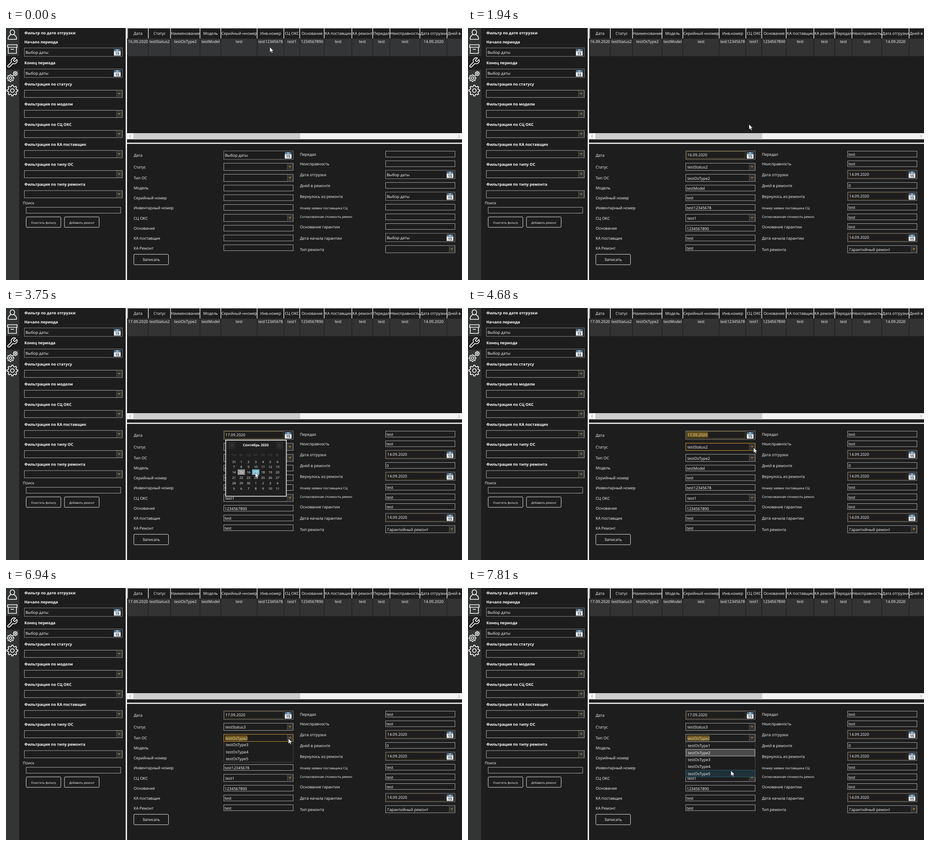
Animation, 1006 px wide and 556 px high, one loop 8 s. Source, as an HTML page:

```html
<!DOCTYPE html>
<html lang="ru">
<head>
<meta charset="utf-8">
<style>
  html, body { margin: 0; width: 100%; height: 100%; overflow: hidden; background: #1d1d1d; }
  svg { display: block; }
  text { font-family: "Open Sans", "Noto Sans", sans-serif; fill: #fff; text-rendering: geometricPrecision; white-space: pre; }
</style>
</head>
<body>
<svg id="stage" width="1006" height="556" viewBox="0 0 1006 556">
  <g id="fixed"></g>
  <g id="live"></g>
  <path id="cursor" d="M0 0V11.6L2.7 9.1L4.6 13.2L6.5 12.4L4.6 8.4H8.3Z" fill="#fff" stroke="#111" stroke-width=".6"/>
</svg>
<script>
const LOOP = 8000, BG = '#1d1d1d', LINE = '#a9a9a9', GOLD = '#d9a032';
const byId = id => document.getElementById(id);

// Drawing helpers; text is placed by its vertical centre.
const rect = (x, y, w, h, fill, stroke = 'none', more = '') =>
  `<rect x="${x}" y="${y}" width="${w}" height="${h}" fill="${fill}" stroke="${stroke}" ${more}/>`;
const text = (x, cy, s, size = 8.6, more = '') =>
  `<text x="${x}" y="${cy + 3.1}" font-size="${size}" ${more}>${s}</text>`;
const mid = (x, cy, s, size, more = '') => text(x, cy, s, size, `text-anchor="middle" ${more}`);
const path = (d, stroke, width, more = '') =>
  `<path d="${d}" fill="none" stroke="${stroke}" stroke-width="${width}" ${more}/>`;
const bold = (x, cy, s) => text(x, cy, s, 8.6, 'font-weight="700"');

const textbox = (x, cy, w, value = '', h = 13) =>
  rect(x + .5, cy - h / 2, w, h, BG, LINE) + text(x + 2.5, cy + .8, value);

function combo(x, cy, w, { value = '', hot = false, marked = false } = {}) {
  const edge = hot ? GOLD : LINE, right = x + w;
  return rect(x + .5, cy - 8, w, 16, BG, edge) +
    rect(right - 12.5, cy - 7.5, 12.5, 15, '#333') +
    path(`M${right - 12.5} ${cy - 7.5}v15`, '#555', .8) +
    path(`M${right - 8.6} ${cy - 1.8}l2.2 2.3l2.2 -2.3`, GOLD, 1.1) +
    (marked ? rect(x + 3.5, cy - 5.5, value.length * 4.25 + 2, 12, '#6b541c') : '') +
    text(x + 4, cy + .7, value, 8.6, marked ? 'style="fill:#f0e4bd"' : '');
}

function datebox(x, cy, w, { value = '', ring = '#453a1a', marked = false } = {}) {
  const ix = x + w - 18, iy = cy - 6.5;
  const icon = rect(ix, iy, 15, 14, '#e9edf0') + rect(ix, iy, 15, 4.5, '#4f7391') +
    rect(ix + 5, iy + .6, 5, 2, '#c5dbe8') +
    mid(ix + 7.5, iy + 9.2, '15', 8, 'font-weight="700" style="fill:#3b444c"');
  const body = value
    ? rect(x + 2.5, cy - 8, w - 24, 15, BG, ring) +
      (marked ? rect(x + 3.5, cy - 7, 46, 12, '#6b541c') : '') +
      text(x + 4, cy - .8, value, 8.6, marked ? 'style="fill:#f0e4bd"' : '')
    : text(x + 3, cy + .4, 'Выбор даты');
  return rect(x + .5, cy - 9.3, w, 18.6, BG, '#8b8b8b') + body + icon;
}

const button = (x, y, w, label, size) =>
  rect(x + .5, y, w, 23, BG, '#e4e4e4', 'rx="2"') + mid(x + w / 2 + .5, y + 11.8, label, size);

function gear(cx, cy, r, teeth, hole, width) {
  let d = '';
  for (let i = 0; i < teeth * 4; i++) {
    const a = (i - .5) / (teeth * 4) * Math.PI * 2, k = i % 4 < 2 ? r : r * .76;
    d += `${i ? 'L' : 'M'}${cx + k * Math.sin(a)} ${cy - k * Math.cos(a)}`;
  }
  return path(d + 'Z', '#fff', width, 'stroke-linejoin="round"') +
    `<circle cx="${cx}" cy="${cy}" r="${hole}" fill="none" stroke="#fff" stroke-width="${width}"/>`;
}

const EDGES = [268, 314, 363, 428, 474, 554, 613, 648, 702, 763, 809, 847, 913, 973];
const HEADS = ['Дата', 'Статус', 'Наименование', 'Модель', 'Серийный нномер', 'Инв.номер', 'СЦ ОКС',
  'Основание', 'КА поставщик', 'КА ремонт', 'Передал', 'Неисправность', 'Дата отгрузки'];
const colMid = i => (EDGES[i] + EDGES[i + 1]) / 2 + .3;

function sidebar() {
  return rect(0, 0, 29, 556, '#333534') + rect(0, 62, 29, 30, BG) +
    path('M14 4a5 5.5 0 0 1 0 11a5 5.5 0 0 1 0 -11M4.5 25c0-6 3-9 6-10.5M23.5 25c0-6-3-9-6-10.5M4.5 25H23.5', '#fff', 1.6) +
    path('M3.5 37h21v5.5h-21zM5 42.5h18v13.5h-18zM10.5 47h7', '#fff', 1.6) +
    path('M14.7 6.3a1 1 0 0 0 0 1.4l1.6 1.6a1 1 0 0 0 1.4 0l3.77-3.77a6 6 0 0 1-7.94 7.94l-6.91 6.91a2.12 2.12 0 0 1-3-3l6.91-6.91a6 6 0 0 1 7.94-7.94l-3.76 3.76z',
      '#fff', 1.5, 'transform="translate(.5 63.5) scale(1.1)"') +
    gear(10, 110.5, 7.6, 8, 2.8, 1.5) + gear(20.5, 100.5, 4.8, 8, 1.5, 1.3) + gear(14, 138, 12, 8, 4, 1.7);
}

function filters() {
  const kinds = ['статусу', 'модели', 'СЦ ОКС', 'КА поставщик', 'типу ОС', 'типу ремонта'];
  return bold(40.5, 10.5, 'Фильтр по дате отгрузки') +
    bold(40.5, 30.5, 'Начало периода') + datebox(40, 53.3, 216) +
    bold(40.5, 77, 'Конец периода') + datebox(40, 99.8, 216) +
    kinds.map((k, i) => bold(40.5, 124 + i * 44.2, 'Фильтрация по ' + k) + combo(40, 145.3 + i * 44.3, 216)).join('') +
    text(37, 385.5, 'Поиск') + textbox(44, 402, 208.5) +
    button(44, 416.8, 76.5, 'Очистить фильтр', 6.5) + button(128.5, 416.8, 76.5, 'Добавить ремонт', 6.5);
}

function frameLines() {
  return rect(264, 0, 3, 556, '#f2f2f2') + rect(267, 253, 739, 2.6, '#f2f2f2') +
    rect(267, 0, 739, 1, '#d0d0d0') +
    EDGES.map(x => rect(x - .7, 0, 1.4, 23, '#f0f0f0')).join('') +
    HEADS.map((h, i) => mid(colMid(i), 12, h)).join('') + text(974.5, 12, 'Дней в') +
    rect(267, 232, 739, 13.5, '#f3f3f3') + rect(281, 232, 368, 13.5, '#cdcdcd') +
    path('M275.5 236l-3 2.8l3 2.8M998 236l3 2.8l-3 2.8', '#8a8a8a', 1);
}

const LEFT = [['Дата', 281], ['Статус', 307], ['Тип ОС', 331], ['Модель', 353], ['Серийный номер', 374.5],
  ['Инвентарный номер', 396.5], ['СЦ ОКС', 419.5], ['Основание', 441.5], ['КА поставщик', 463.5], ['КА Ремонт', 485.5]];
const RIGHT = [['Передал', 278.5], ['Неисправность', 300], ['Дата отгрузки', 324], ['Дней в ремонте', 347.5],
  ['Вернулось из ремонта', 372], ['Номер заявки поставщика СЦ', 396.5, 7.2], ['Согласованная стоимость ремон', 415.5, 7.2],
  ['Основание гарантии', 438.5], ['Дата начала гарантии', 463.5], ['Тип ремонта', 488.5]];

const labels = () => LEFT.map(([s, y]) => text(281.7, y, s)).join('') +
  '<svg x="640" y="256" width="124" height="250"><g transform="translate(-640 -256)">' +
  RIGHT.map(([s, y, size]) => text(648.5, y, s, size)).join('') + '</g></svg>' +
  button(281.5, 499.3, 76.5, 'Записать', 8.6);

// Pointer moves: start, end, from, to, easing.
const sine = p => (1 - Math.cos(Math.PI * p)) / 2;
const MOVES = [
  [1590, 1940, [582, 42], [620, 212], p => p],
  [1940, 2240, [620, 212], [621, 282], p => p * (2 - p)],
  [2900, 3470, [621, 282], [550, 363], sine],
  [4180, 4680, [550, 363], [630, 308], sine],
  [5210, 5630, [630, 308], [600, 354], sine],
  [6250, 6800, [600, 354], [623, 332], sine],
  [7270, 7810, [623, 332], [580, 403], sine]
];
const part = (t, a, b) => Math.min(1, Math.max(0, (t - a) / (b - a)));

function pointer(t) {
  let at = MOVES[0][2];
  for (const [a, b, from, to, ease] of MOVES) {
    if (t < a) break;
    const k = ease(part(t, a, b));
    at = from.map((v, i) => v + (to[i] - v) * k);
  }
  return at;
}

// A popup that slides down from behind its upper edge.
const slide = (x, y, w, h, p, inner) =>
  `<svg x="${x}" y="${y}" width="${w}" height="${h}"><g transform="translate(0 ${(p - 1) * h})">${inner}</g></svg>`;

function list(top, name, chosen, p, [mx, my]) {
  const step = 15.35, h = 78;
  const over = mx > 480 && mx < 634 && p === 1 ? Math.floor((my - top - 1) / step) : -1;
  let s = rect(.5, .5, 153, h - 1, BG, '#4a4a4a');
  for (let i = 0; i < 5; i++) {
    const y = 1 + i * step;
    if (i === chosen) s += rect(1, y, 152, step - .4, '#4a4a4a', '#d5d5d5', 'stroke-width=".9"');
    else if (i === over) s += rect(1, y, 152, step - .4, '#1f3039', '#2b6378', 'stroke-width=".9"');
    s += text(5, y + 7.8, name + (i + 1));
  }
  return slide(480, top, 154, h, p, s);
}

function calendar(p, picked, [mx, my]) {
  let s = rect(1, 1, 134, 124, '#1f1f1f', '#f2f2f2', 'stroke-width="1.8"') +
    rect(7, 5, 16, 15, '#292929') + rect(112, 5, 16, 15, '#292929') +
    path('M16.5 9l-3.5 3l3.5 3zM118.5 9l3.5 3l-3.5 3z', '#444', 1) +
    mid(67.5, 11, 'Сентябрь 2020', 7.6, 'font-weight="700"');
  ['Пн', 'Вт', 'Ср', 'Чт', 'Пт', 'Сб', 'Вс'].forEach((d, i) =>
    s += mid(19.5 + i * 16, 33, d, 7.6, 'font-weight="600" style="fill:#454545"'));
  for (let i = 0; i < 42; i++) {
    const x = 19.5 + i % 7 * 16, y = 48 + Math.floor(i / 7) * 11.8;
    const day = i === 0 ? 31 : i <= 30 ? i : i - 30;
    const over = Math.abs(mx - 484 - x) < 8 && Math.abs(my - 291 - y) < 5.9;
    const fill = i === picked ? '#7fc0d8' : i === 15 ? '#969896' : over ? '#4c7686' : '';
    if (fill) s += rect(x - 8, y - 5.9, 16, 11.8, fill);
    s += mid(x, y, day, 7);
  }
  return slide(483.5, 290.5, 136, 126, p, s);
}

function live(t, at) {
  const on = t >= 1120, v = s => on ? s : '';
  const date = t < 3750 ? '16.09.2020' : '17.09.2020', later = '14.09.2020';
  const status = t < 5910 ? 'testStatus2' : 'testStatus3';
  const statusOpen = t >= 4830 && t < 5910, typeOpen = t >= 6873, calOpen = t >= 2390 && t < 3810;
  const hot = cy => !calOpen && at[0] > 480 && at[0] < 634 && Math.abs(at[1] - cy) < 8.5;

  const cells = [date, status, 'testOsType2', 'testModel', 'test', 'test12345678', 'test1', '1234567890',
    'test', 'test', 'test', 'test', later];
  let s = rect(267, 23.5, 739, 38.5, on ? '#333' : '#343536') +
    EDGES.map(x => rect(x - .5, 23.5, 1, 38.5, '#1b1b1b')).join('') +
    cells.map((c, i) => mid(colMid(i), 30.3, c)).join('');

  const L = 480, R = 837, W = 153;
  s += datebox(L, 280.6, W, { value: v(date), ring: t < 4830 ? '#6a541f' : '#4a3e1b', marked: t >= 3810 && t < 4830 }) +
    combo(L, 306.3, W, { value: v(status), hot: hot(306.3) && !typeOpen, marked: t >= 4830 && t < 6873 }) +
    combo(L, 330.7, W, { value: v('testOsType2'), hot: hot(330.7) && !statusOpen, marked: typeOpen }) +
    textbox(L, 353.2, W, v('testModel')) + textbox(L, 374.5, W, v('test')) +
    textbox(L, 396, W, v('test12345678')) + combo(L, 419, W, { value: v('test1') }) +
    textbox(L, 441.7, W, v('1234567890')) + textbox(L, 463.3, W, v('test')) + textbox(L, 484.8, W, v('test'));

  [278.2, 299.5, 347.3, 395.3, 416.7, 438].forEach((cy, i) => s += textbox(R, cy, W, v(i === 2 ? '0' : 'test')));
  [323.3, 371.3, 462.3].forEach(cy => s += datebox(R, cy, W, { value: v(later) }));
  s += combo(R, 488, W, { value: v('Гарантийный ремонт') });

  if (calOpen) s += calendar(part(t, 2370, 2500), t < 3750 ? 16 : 17, at);
  if (statusOpen) s += list(315, 'testStatus', 1, part(t, 4813, 4930), at);
  if (typeOpen) s += list(339.5, 'testOsType', 1, part(t, 6873, 6990), at);
  return s;
}

byId('fixed').innerHTML = rect(0, 0, 1006, 556, BG) + sidebar() + filters() + frameLines() + labels();

let last = '';
const start = performance.now();
function draw() {
  const t = (performance.now() - start) % LOOP, at = pointer(t), html = live(t, at);
  if (html !== last) byId('live').innerHTML = last = html;
  byId('cursor').setAttribute('transform', `translate(${at})`);
  requestAnimationFrame(draw);
}
draw();
</script>
</body>
</html>
```
